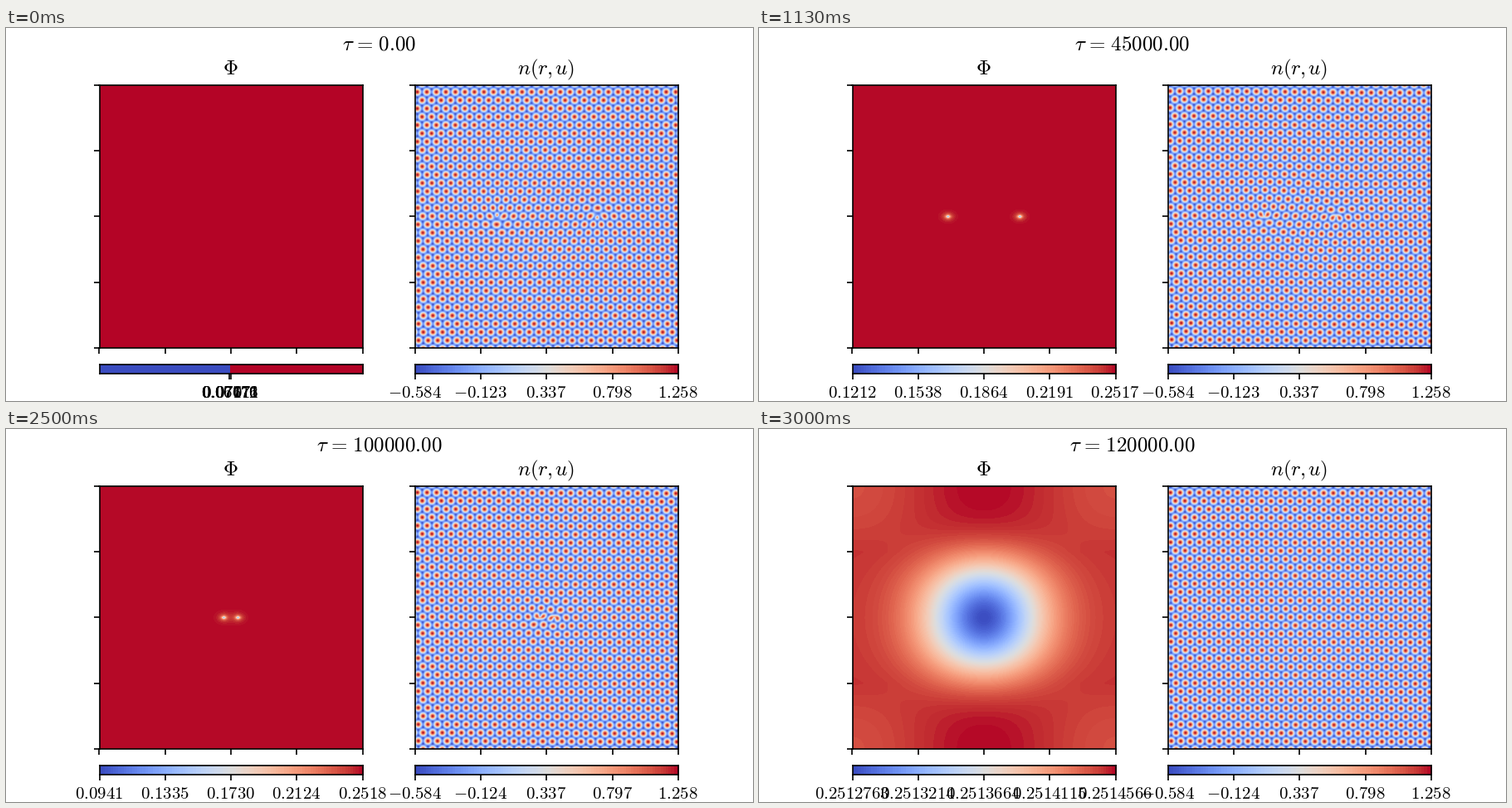
Write a matplotlib script that moves like this. It is 900 by 450 pixels and loops after 3120 ms.

```python
import numpy as np
import matplotlib.pyplot as plt
from matplotlib.animation import FuncAnimation

W, H, DPI = 900, 450, 150
FRAMES, LOOP_MS = 25, 3120
SIDE, BOTTOM = 317.05, 64
LEFT_X, RIGHT_X = 112.5, 492.95
BAR_Y, BAR_H = 33, 11
SPACING = 11.5                 # lattice constant in pixels
SHEAR = 0.003                  # strain of the relaxed lattice
MERGE = 102.4                  # time of annihilation, in thousands

plt.rcParams["mathtext.fontset"] = "cm"
fig = plt.figure(figsize=(W / DPI, H / DPI), dpi=DPI, facecolor="white")


def panel(x, y, h):
    return fig.add_axes([x / W, y / H, SIDE / W, h / H])


def label(x, y, text, size):
    """Math text with its baseline y pixels below the top edge."""
    return fig.text(x / W, 1 - y / H, text, size=size,
                    ha="center", va="baseline")


def map_axes(x, title):
    ax = panel(x, BOTTOM, SIDE)
    ax.set(xlim=(-1, 1), ylim=(-1, 1))
    ax.set_xticks(np.linspace(-1, 1, 5), [""] * 5)
    ax.set_yticks(np.linspace(-1, 1, 5), [""] * 5)
    label(x + SIDE / 2 - 0.5, 56.5, title, 12)
    return ax


def bar_axes(x):
    ax = panel(x, BAR_Y, BAR_H)
    ramp = ax.imshow(np.linspace(0, 1, 99)[None], cmap="coolwarm", vmin=0,
                     vmax=1, aspect="auto", extent=(0, 1, 0, 1),
                     interpolation="nearest")
    ax.set_yticks([])
    ax.set_xticks(np.linspace(0, 1, 5), [""] * 5)
    texts = [label(x + SIDE * i / 4 - 0.5, 446, "", 10) for i in range(5)]
    return ax, ramp, texts


phi_ax = map_axes(LEFT_X, r"$\Phi$")
n_ax = map_axes(RIGHT_X, r"$n(r,\hspace{-0.08}u)$")
phi_bar, phi_ramp, phi_texts = bar_axes(LEFT_X)
n_bar, n_ramp, n_texts = bar_axes(RIGHT_X)
heading = label(W / 2 - 0.5, 26.7, "", 12)

# Field grid, in units of half a side
axis = np.linspace(-1, 1, 241)
U, V = np.meshgrid(axis, axis)

# Lattice grid, in pixels from the centre
px = np.arange(317) - 158
X, Y = np.meshgrid(px + 0.01, px + 0.01)
density = n_ax.imshow(np.zeros(X.shape), cmap="coolwarm", vmin=0, vmax=1,
                      extent=(-1, 1, -1, 1), origin="lower",
                      interpolation="bilinear", zorder=0)

PHI_KEYS = [1, 3, 9, 17, 20]
PHI_LO = [0.1075, 0.10902, 0.121152, 0.10200, 0.09413]
PHI_HI = [0.25173, 0.25174, 0.25174, 0.25177, 0.25178]
BOWL_RANGE = {21: (0.2501873, 0.2514602), 22: (0.25106904, 0.25145874),
              23: (0.25118937, 0.25145763), 24: (0.25127632, 0.25145656)}
N_KEYS = [0, 6, 9, 12, 15, 17, 20, 22, 24]
N_HI = [1.2582, 1.2574, 1.2581, 1.2581, 1.2577, 1.2573, 1.2576, 1.2577, 1.2584]
N_LO = [-.5838, -.5838, -.5838, -.5838, -.5838, -.5837, -.5840, -.5840, -.5842]
FLAT_LABELS = ["0.07071", "0.06776", "0.07176", "0.07111", "0.07672"]


def gap(time):
    """Distance between the two defects in pixels."""
    left = max(MERGE - time, 0)
    return np.sqrt(left * (119 + 0.2 * left))


def dipole_field(time):
    half = gap(time) / 2
    dip = 0
    for x0 in (-half, half):
        r2 = (U * SIDE / 2 - x0) ** 2 + (1.35 * V * SIDE / 2) ** 2
        dip = dip + (1 + r2 / 2.5 ** 2) ** -1.4
    return np.clip(1 - dip, 0, 1)


def bowl_field(time):
    """A round well that widens over a periodic, nearly flat background."""
    keys = [105, 110, 120]
    mid = np.interp(time, keys, [0.986, 0.975, 0.953])
    amp = np.interp(time, keys, [0.016, 0.033, 0.046])
    power = np.interp(time, keys, [0.5, 0.5, 1])
    width = np.interp(time, keys, [0.25, 0.33, 0.44])
    cu, cv = np.cos(np.pi * U), np.cos(np.pi * V)
    far = mid + cu * np.where(cv < 0, amp * np.abs(cv) ** power, 0.006 * cv)
    depth = (np.hypot(U, V) / width) ** 1.9 + (V / (1.4 * width)) ** 4
    return np.clip(far * (1 - np.exp(-depth)), 0, 1)


def lattice(time):
    """Hexagonal density displaced by a pair of edge dislocations."""
    relaxed = time > 0
    ux, uy, amp = -SHEAR * relaxed * Y, -SHEAR * relaxed * X, 1
    half = gap(time) / 2
    if half > 0:
        b, nu = SPACING / (2 * np.pi), 0.3
        for sign, x0 in ((1, -half), (-1, half)):
            dx = X - x0
            r2 = dx ** 2 + Y ** 2 + 16
            ux = ux + sign * b * (np.arctan2(Y, dx)
                                  + relaxed * dx * Y / (2 * (1 - nu) * r2))
            uy = uy - sign * relaxed * b / (4 * (1 - nu)) * (
                (1 - 2 * nu) * np.log(r2) + (dx ** 2 - Y ** 2) / r2)
            amp = amp * (1 - 0.4 * np.exp(-r2 / 20))
    q = 2 * np.pi / SPACING
    qx, qy = q * (X - ux), q * (Y - uy) / np.sqrt(3)
    waves = np.cos(2 * qy) + 2 * np.cos(qx) * np.cos(qy)
    return np.clip(1 / 3 + amp * waves / 4.5, 0, 1) ** 0.75


def set_labels(texts, lo, hi, digits):
    for text, value in zip(texts, np.linspace(lo, hi, 5)):
        text.set_text(f"${value:.{digits}f}$")


def spread_bar_labels(flat):
    """Collapse the left bar's ticks to its middle while the field is flat."""
    ticks = [0.495, 0.5] if flat else np.linspace(0, 1, 5)
    phi_bar.set_xticks(ticks, [""] * len(ticks))
    for i, text in enumerate(phi_texts):
        pos = 0.4985 if flat else i / 4
        text.set_x((LEFT_X + SIDE * pos - 0.5) / W)
    ramp = np.linspace(0, 1, 99)
    phi_ramp.set_data((ramp > 0.495).astype(float)[None] if flat
                      else ramp[None])


contours = []


def update(k):
    time = 5 * k
    heading.set_text(r"$\tau\hspace{0.11}=\hspace{0.11}%.2f$" % (time * 1000))

    while contours:
        contours.pop().remove()
    phi_ax.set_facecolor(plt.cm.coolwarm(1.0))
    spread_bar_labels(k == 0)
    if k == 0:
        for text, value in zip(phi_texts, FLAT_LABELS):
            text.set_text(f"${value}$")
    else:
        if k in BOWL_RANGE:
            field = bowl_field(time)
            set_labels(phi_texts, *BOWL_RANGE[k], 6 if k == 21 else 7)
        else:
            field = dipole_field(time)
            set_labels(phi_texts, np.interp(k, PHI_KEYS, PHI_LO),
                       np.interp(k, PHI_KEYS, PHI_HI), 4)
        contours.append(phi_ax.contourf(U, V, field, np.linspace(0, 1, 100),
                                        cmap="coolwarm", vmin=0, vmax=1,
                                        zorder=0))

    density.set_data(lattice(time))
    set_labels(n_texts, np.interp(k, N_KEYS, N_LO),
               np.interp(k, N_KEYS, N_HI), 3)
    return []


anim = FuncAnimation(fig, update, frames=FRAMES, interval=LOOP_MS / FRAMES,
                     init_func=lambda: update(0), repeat=True, repeat_delay=0,
                     blit=False)
plt.show()
```
